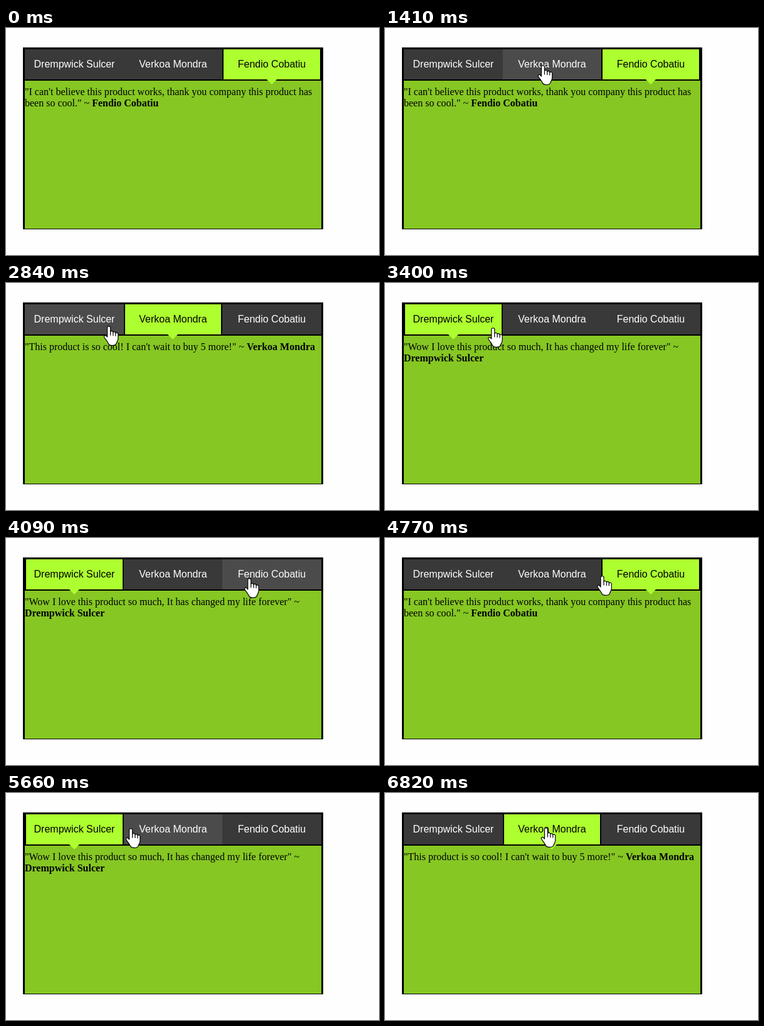
An HTML page for the animation above (6.89 s loop, 595 px wide and 362 px high).

```html
<!DOCTYPE html>
<html lang="en">
<head>
<meta charset="utf-8">
<title>Testimonial tabs</title>
<style>
  html, body { margin: 0; width: 100%; height: 100%; overflow: hidden; background: #fefefe; }
  svg { display: block; }
  .tab text { font: 16px "Liberation Sans", Arial, sans-serif; text-anchor: middle; fill: #fff; }
  .tab .back { fill: #393939; }
  .tab .lit { display: none; fill: #adff2f; }
  .tab.hover .back { fill: #4b4b4b; }
  .tab.active .lit { display: inline; }
  .tab.active .back { fill: #000; }
  .tab.active text { fill: #000; }
  .quote { font: 16px "Liberation Serif", "Times New Roman", serif; white-space: pre; }
  .name { font-weight: bold; }
  #cursor path { fill: #fff; stroke: #000; stroke-width: 1.2; stroke-linejoin: round; stroke-linecap: round; }
  #cursor .crease { fill: none; }
</style>
</head>
<body>
<svg width="595" height="362" viewBox="0 0 595 362">
  <path d="M27 31H506V321H27Z"/>
  <path d="M30 84H503V320H30Z" fill="#86c723"/>
  <g id="tabs"></g>
  <g id="quotes"></g>
  <g id="cursor">
    <g id="hand">
      <path d="M6 3C6 0 11 0 11 3V9.5C12 8 15 8 15.3 10.5C16.5 9 19 9.3 19.3 11.7C20.5 10.5 23.3 11 23.3 13.5V20C23.3 24 21 26 20.5 28C20 30.5 17 31.4 13.5 31.4C10 31.4 8.5 30.5 7.5 28C6 24.5 3 21.5 1.2 18.5C0 16 2.5 14.5 4.2 16L6 18Z"/>
      <path class="crease" d="M11 9.5V15M15.3 10.5V15.5M19.3 11.7V16"/>
    </g>
    <path id="arrow" d="M8.5 .5V25L14 19.8L17.6 28L21.4 26.3L17.8 18.4H25.5Z"/>
  </g>
</svg>
<script>
const LOOP = 6890, LEFT = 30, WIDTH = 473, NAV_BOTTOM = 84;

const people = [
  { name: "Drempwick Sulcer",
    lines: ['"Wow I love this product so much, It has changed my life forever" ~', ""] },
  { name: "Verkoa Mondra",
    lines: ['"This product is so cool! I can\'t wait to buy 5 more!" ~ '] },
  { name: "Fendio Cobatiu",
    lines: ['"I can\'t believe this product works, thank you company this product has',
            'been so cool." ~ '] }
];

// Pointer stops: time and tip position
const stops = [
  { t: 1060, x: 480, y: 171 },
  { t: 1410, x: 252, y: 59 },
  { t: 2210, x: 219, y: 60 },
  { t: 2980, x: 152, y: 70 },
  { t: 3400, x: 172, y: 71 },
  { t: 4170, x: 413, y: 63 },
  { t: 4630, x: 413, y: 63 },
  { t: 4770, x: 347, y: 60 },
  { t: 5260, x: 120, y: 62 },
  { t: 5390, x: 120, y: 62 },
  { t: 5660, x: 199, y: 56 },
  { t: 6080, x: 246, y: 55 },
  { t: 6550, x: 247, y: 55 },
  { t: 6820, x: 257, y: 55 },
  { t: LOOP, x: 257, y: 55 }
];
const clickTimes = [1820, 3200, 4170, 5390, 6620];

const $ = id => document.getElementById(id);
const show = (el, on) => { el.style.display = on ? "" : "none"; };
const edge = i => Math.round(LEFT + WIDTH * i / people.length);
const tabAt = x => people.findIndex((p, i) => x >= edge(i) && x < edge(i + 1));

function add(parent, tag, attrs, text) {
  const el = document.createElementNS("http://www.w3.org/2000/svg", tag);
  for (const key in attrs) el.setAttribute(key, attrs[key]);
  if (text) el.textContent = text;
  parent.append(el);
  return el;
}

people.forEach((p, i) => {
  const x = edge(i), w = edge(i + 1) - x, mid = x + w / 2;
  p.tab = add($("tabs"), "g", {});
  add(p.tab, "rect", { class: "back", x, y: 34, width: w, height: 48 });
  add(p.tab, "rect", { class: "lit", x: x + 2, y: 34, width: w - 4, height: 48 });
  add(p.tab, "path", { class: "lit", d: `M${Math.floor(mid) - 8} 82h16l-8 8z` });
  add(p.tab, "text", { x: mid, y: 63 }, p.name);

  p.quote = add($("quotes"), "g", { class: "quote" });
  const rows = p.lines.map((line, n) => add(p.quote, "text", { x: LEFT, y: 107 + 18 * n }, line));
  add(rows.at(-1), "tspan", { class: "name" }, p.name);
});

function pointerAt(t) {
  const i = stops.findIndex(s => s.t > t);
  if (i < 1) return null;
  const a = stops[i - 1], b = stops[i];
  const f = (t - a.t) / (b.t - a.t);
  return { x: a.x + (b.x - a.x) * f, y: a.y + (b.y - a.y) * f };
}

// The last click picks the tab under the pointer; the last tab is open at first
function activeAt(t) {
  const click = clickTimes.filter(c => c <= t).pop();
  return click ? tabAt(pointerAt(click).x) : people.length - 1;
}

function draw(t) {
  const active = activeAt(t), tip = pointerAt(t);
  const onTabs = tip && tip.y < NAV_BOTTOM;
  const hover = onTabs ? tabAt(tip.x) : -1;
  people.forEach((p, i) => {
    const state = i === active ? "active" : i === hover ? "hover" : "";
    p.tab.setAttribute("class", "tab " + state);
    show(p.quote, i === active);
  });
  show($("cursor"), tip);
  if (!tip) return;
  show($("hand"), onTabs);
  show($("arrow"), !onTabs);
  $("cursor").setAttribute("transform", `translate(${tip.x - 8.5} ${tip.y})`);
}

const start = performance.now();
function tick() {
  draw((performance.now() - start) % LOOP);
  requestAnimationFrame(tick);
}
tick();
</script>
</body>
</html>
```
